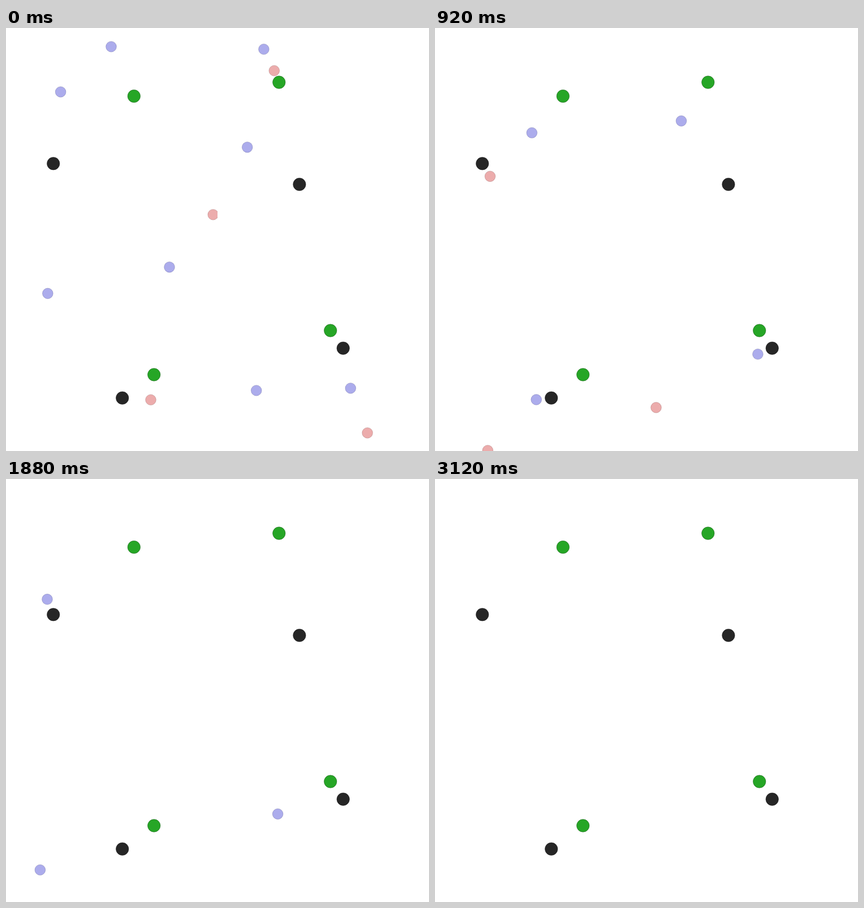
An HTML page with a canvas for the animation above (3.24 s loop, 748 by 748 pixels).

```html
<!DOCTYPE html>
<html>
<head>
<meta charset="utf-8">
<style>
  html, body { margin: 0; height: 100%; overflow: hidden; background: #fff; }
  canvas { display: block; }
</style>
</head>
<body>
<canvas id="stage" width="748" height="748"></canvas>
<script>
const ctx = document.getElementById('stage').getContext('2d');
const SIZE = 374, STEP = 40, LOOP = 3240;
const AGENT = SIZE / 40, LANDMARK = SIZE * 0.03;
const BLUE = [89, 89, 217], RED = [217, 89, 89], GREEN = [38, 166, 38], BLACK = [38, 38, 38];

// Steady drift per step plus a push that is absorbed by critical damping
const glide = (start, drift, push = 0, tau = 4) => step =>
  start + drift * step + push * (1 - (1 + step / tau) * Math.exp(-step / tau));

// One world per quarter of the stage, left to right and top to bottom
const worlds = [
  { green: [226.3, 120.5], black: [83.7, 239.7], agents: [
    [RED, glide(366.2, -13.6, 45), glide(330, -1.2, -41)],
    [BLUE, glide(96.6, -5.1, 217, 6.2), glide(113, 1.1, 48)],
    [BLUE, glide(186, -3), glide(33, -8)]] },
  { green: [482.8, 96], black: [518.9, 276.5], agents: [
    [RED, glide(474.3, -10.5, 51), glide(75.5, 10, 45)],
    [BLUE, glide(426.7, -3.4, 90, 4.4), glide(210.8, 1.78, -87.5, 2.5)],
    [BLUE, glide(455.9, -2), glide(37.5, -8.5)]] },
  { green: [261.7, 613], black: [205.7, 654.2], agents: [
    [RED, glide(256, -7.5, 10), glide(657.5, 6, -49.5)],
    [BLUE, glide(289, -4.95, 4, 1), glide(422.8, 1.35, 205, 3.35)],
    [BLUE, glide(73.8, -11.2), glide(469.4, -9)]] },
  { green: [573.7, 535], black: [596.2, 566.2], agents: [
    [RED, glide(639.1, -12, 28.5), glide(716, -0.5, -33.5, 3)],
    [BLUE, glide(609.3, -3.77, 48.5, 3), glide(637, 0.72, -78.5)],
    [BLUE, glide(442.7, -9, 99), glide(641, -10, 56)]] }
];

function disc(x, y, radius, color, alpha) {
  ctx.beginPath();
  ctx.arc(x, y, radius, 0, 2 * Math.PI);
  ctx.fillStyle = `rgba(${color}, ${alpha})`;
  ctx.fill();
  ctx.strokeStyle = `rgba(${color.map(c => c >> 1)}, ${alpha / 2})`;
  ctx.stroke();
}

function draw(time) {
  const step = Math.floor(time % LOOP / STEP);
  ctx.clearRect(0, 0, 2 * SIZE, 2 * SIZE);
  worlds.forEach(({ green, black, agents }, i) => {
    ctx.save();
    ctx.beginPath();
    ctx.rect(i % 2 * SIZE, (i >> 1) * SIZE, SIZE, SIZE);
    ctx.clip();
    for (const [color, x, y] of agents) disc(x(step), y(step), AGENT, color, 0.5);
    disc(...green, LANDMARK, GREEN, 1);
    disc(...black, LANDMARK, BLACK, 1);
    ctx.restore();
  });
}

const start = performance.now();
function tick() {
  draw(performance.now() - start);
  requestAnimationFrame(tick);
}
tick();
</script>
</body>
</html>
```
